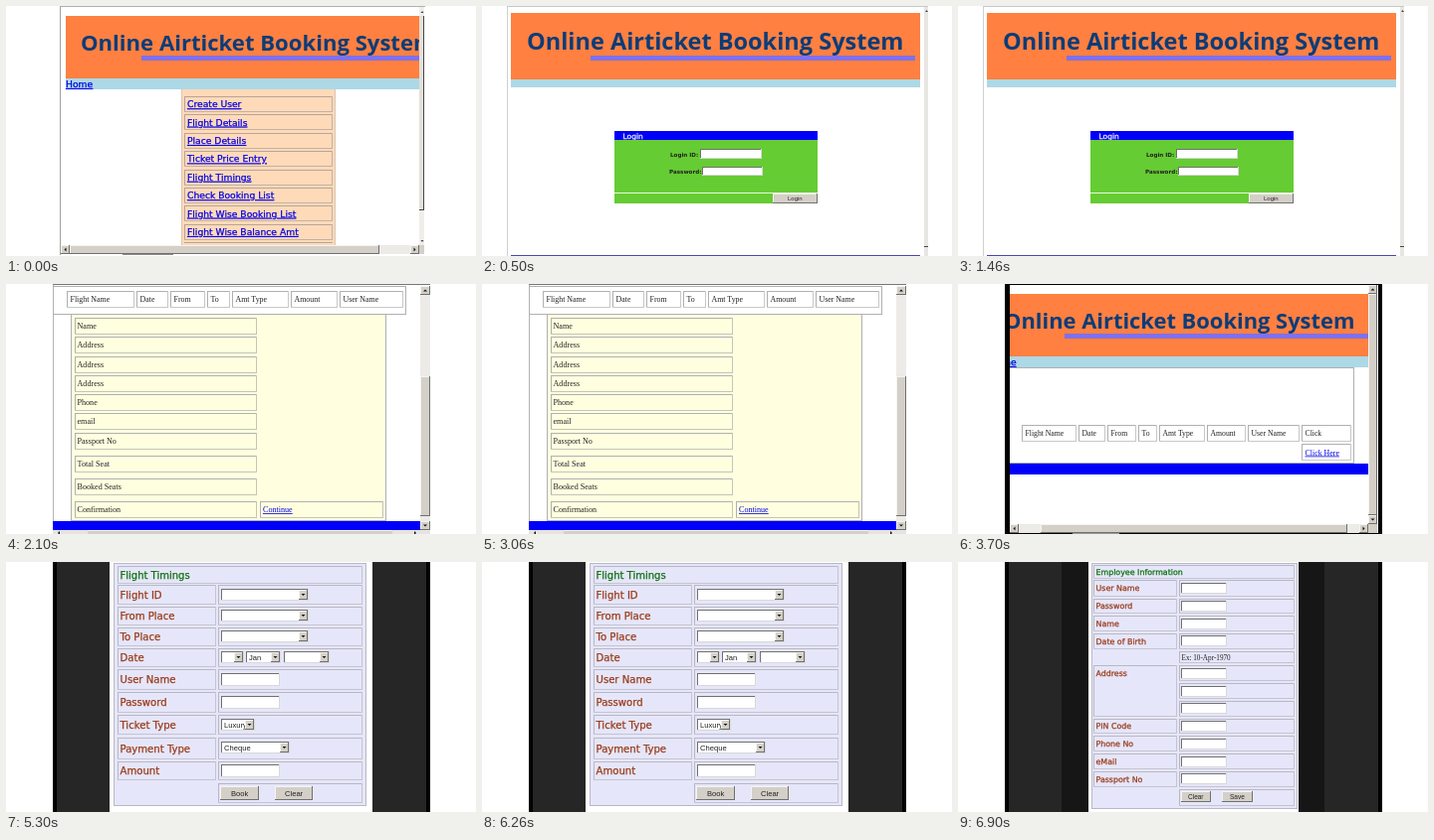
An HTML page that plays this animation: 472x252 px, repeating every 8000 ms.

```html
<!DOCTYPE html>
<html lang="en">
<head>
<meta charset="utf-8">
<title>Airticket booking screens</title>
<style>
html, body { margin: 0; width: 100%; height: 100%; overflow: hidden; background: #fff; }
svg { display: block; width: 472px; height: 252px; }
rect { shape-rendering: crispEdges; }
text { white-space: pre; }
.title { font-family: "Open Sans", sans-serif; font-weight: 700; fill: #0c3c78; }
.wide { font-family: "DejaVu Sans", sans-serif; stroke: currentColor; stroke-width: .25px; }
.bold { font-family: "DejaVu Sans", sans-serif; font-weight: 700; }
.serif { font-family: "Liberation Serif", serif; }
.plain { font-family: "Liberation Sans", sans-serif; }
.link { fill: #0000e6; color: #0000e6; text-decoration: underline; }
</style>
</head>
<body>
<svg id="stage" viewBox="0 0 472 252"></svg>
<script>
const ORANGE = '#ff8040', SKY = '#add8e6', BLUE = '#0000f8', FACE = '#d4d0c8', PEACH = '#ffdab9',
      LAVENDER = '#e6e6fa', EDGE = '#b0b0b0', SOFT = '#b8b8c4', BROWN = '#993a18', GREEN = '#0a700a';

// Boxes are given by their left, top, right and bottom edges.
const box = (l, t, r, b, fill) =>
  `<rect x="${l}" y="${t}" width="${r - l}" height="${b - t}" fill="${fill}"/>`;
const frame = (l, t, r, b, fill, dark = EDGE, light = dark) =>
  box(l, t, r, b, light) + box(l, t, r - 1, b - 1, dark) + box(l + 1, t + 1, r - 1, b - 1, fill);
const text = (s, x, y, size, cls, fill = '#222') =>
  `<text x="${x}" y="${y}" font-size="${size}" class="${cls}" fill="${fill}" color="${fill}">${s}</text>`;

const field = (l, t, r, b) => frame(l, t, r, b, '#fff', '#707070', '#d8d8d8');
const raised = (l, t, r, b) => frame(l, t, r, b, FACE, '#f4f4f0', '#707070');
const button = (l, t, r, b, s, x, size) =>
  raised(l, t, r, b) + text(s, x, (t + b) / 2 + size * .36, size, 'plain');

const TURN = { up: 180, down: 0, left: 90, right: -90 };
const arrow = (x, y, way, k = 2) =>
  `<path d="M${-k} ${-k / 2}H${k}L0 ${k / 2}Z" transform="translate(${x} ${y}) rotate(${TURN[way]})" fill="#111"/>`;
const select = (l, y, r, s = '') =>
  field(l, y - 6, r, y + 6) + text(s, l + 3, y + 2.8, 7.6, 'plain') +
  raised(r - 10, y - 5, r - 1, y + 5) + arrow(r - 5.5, y, 'down');

function barX(l, t, r, b, from, to) {
  const y = (t + b) / 2;
  return box(l, t, r, b, '#ecebe7') + raised(from, t, to, b) +
    raised(l, t, l + 9, b) + raised(r - 9, t, r, b) +
    arrow(l + 4.5, y, 'left') + arrow(r - 4.5, y, 'right');
}
function barY(l, t, r, b, from, to) {
  const x = (l + r) / 2;
  return box(l, t, r, b, '#ecebe7') + raised(l, from, r, to) +
    raised(l, t, r, t + 9) + raised(l, b - 9, r, b) +
    arrow(x, t + 4.5, 'up') + arrow(x, b - 4.5, 'down');
}

const banner = (l, r, top, split, end, x, y, size, lineL, lineR, lineY) =>
  box(l, top, r, split, ORANGE) + box(l, split, r, end, SKY) +
  box(lineL, lineY, lineR, lineY + 5, '#8070ec') +
  text('Online Airticket Booking System', x, y, size, 'title');

const tableRow = (cells, t, b, size) => cells.map(([l, r, s]) =>
  frame(l, t, r, b, '#fff', EDGE, '#c8c8c8') +
  text(s, l + 3.5, (t + b) / 2 + size * .31, size, 'serif')).join('');

function menu() {
  const items = ['Create User', 'Flight Details', 'Place Details', 'Ticket Price Entry',
    'Flight Timings', 'Check Booking List', 'Flight Wise Booking List', 'Flight Wise Balance Amt'];
  const rows = items.map((s, i) => {
    const y = 99 + i * 18.4, top = Math.round(y - 8);
    return frame(179, top, 328, top + 16, PEACH, '#b8a498', '#c4b0a4') +
      text(s, 182, y + 3.2, 9.2, 'wide link');
  }).join('');
  return box(54, 0, 421, 1, '#b0b0b0') + box(54, 1, 55, 251, '#a0a0a0') +
    banner(60, 415, 10, 73, 84, 75, 45, 22.1, 136, 415, 50) +
    text('Home', 60, 82, 9.2, 'wide link') +
    box(176, 84, 331, 241, PEACH) + box(176, 84, 177, 241, '#dcc4b0') +
    box(330, 84, 331, 241, '#dcc4b0') + rows + box(179, 238, 328, 239, '#b8a498') +
    box(415, 1, 472, 241, '#fff') + box(415, 1, 420, 241, '#f0eeea') +
    box(415, 10, 419, 205, '#e2e0da') + box(419, 10, 420, 205, '#444') +
    box(415, 205, 420, 206, '#444') +
    arrow(418, 6, 'up', 1.5) + arrow(418, 237, 'down', 1.5) +
    barX(55, 241, 415, 250, 64, 375) + box(415, 241, 420, 250, FACE) +
    box(117, 250, 168, 251, '#888');
}

function login() {
  return box(25, 0, 448, 1, '#c8c8c8') + box(25, 1, 26, 252, '#d0d0d0') +
    banner(29, 440, 7, 74, 82, 45, 43.5, 23.5, 109, 435, 50) +
    box(444, 1, 448, 252, '#e8e6e2') +
    box(444, 242, 448, 243, '#444') + arrow(446.5, 5, 'up', 1.5) +
    box(133, 126, 337, 135, BLUE) + text('Login', 141.5, 133.5, 7.5, 'wide', '#fff') +
    box(133, 135, 337, 199, '#66cc33') + box(133, 188, 337, 189, '#e8f8e0') +
    text('Login ID:', 189, 151.5, 5.6, 'bold') + field(219, 144, 281, 154) +
    text('Password:', 188, 169, 5.6, 'bold') + field(221, 162, 282, 171) +
    button(292, 189, 337, 199, 'Login', 307, 6) +
    box(29, 251, 440, 252, '#4a48b0');
}

function passenger() {
  const labels = ['Name', 'Address', 'Address', 'Address', 'Phone', 'email',
    'Passport No', 'Total Seat', 'Booked Seats', 'Confirmation'];
  const cell = (l, t, r) => frame(l, t, r, t + 17, '#ffffe0', EDGE, '#c4c4b8');
  const rows = labels.map((s, i) => {
    const y = i < 7 ? 42.5 + i * 19.25 : 181.5 + (i - 7) * 23;
    return cell(69, Math.round(y - 8.5), 252) + text(s, 71.5, y + 2.6, 8.1, 'serif');
  }).join('');
  return box(47, 0, 426, 1, '#777') + box(47, 1, 48, 252, '#b4b4b4') +
    frame(47, 2, 402, 31, '#fff') +
    tableRow([[61, 129, 'Flight Name'], [131, 163, 'Date'], [165, 200, 'From'], [202, 225, 'To'],
      [227, 284, 'Amt Type'], [286, 333, 'Amount'], [335, 399, 'User Name']], 7, 24, 7.9) +
    frame(65, 30, 382, 239, '#ffffe0') + rows +
    cell(255, 219, 379) + text('Continue', 258, 230.2, 8.1, 'serif link') +
    box(47, 239, 416, 248, BLUE) +
    barY(416, 2, 426, 248, 93, 234) +
    box(47, 248, 426, 252, '#e6e4e0') + box(82, 248, 388, 252, FACE) +
    box(82, 248, 388, 249, '#f4f4f4') + arrow(53, 251, 'left') + arrow(411, 251, 'right');
}

function booking() {
  return box(47, 0, 426, 252, '#000') + box(52, 1, 422, 251, '#fff') +
    `<svg x="52" width="360" height="252" viewBox="52 0 360 252">` +
    banner(52, 412, 10, 73, 84, 46, 45, 21.9, 107, 412, 50) +
    text('Home', 31.5, 82, 9.2, 'wide link') +
    frame(48, 84, 398, 181, '#fff') + '</svg>' +
    tableRow([[64, 119, 'Flight Name'], [121, 148, 'Date'], [150, 179, 'From'], [181, 200, 'To'],
      [202, 248, 'Amt Type'], [250, 289, 'Amount'], [291, 343, 'User Name'],
      [345, 395, 'Click']], 142, 159, 7.7) +
    tableRow([[345, 395, '']], 161, 178, 7.7) +
    text('Click Here', 348.5, 172.5, 7.9, 'serif link') +
    box(52, 181, 412, 192, BLUE) +
    barY(412, 1, 421, 242, 10, 233) + barX(52, 242, 412, 251, 83, 391) +
    box(412, 242, 421, 251, FACE) + box(115, 251, 162, 252, '#999');
}

// A form row has a label cell and an empty cell for its controls.
const cell = (l, t, r, b) => frame(l, t, r, b, LAVENDER, SOFT, '#c4c4d0');
const formRow = (left, mid, right, t, b, s, size) =>
  cell(left, t, mid - 2, b) + cell(mid, t, right, b) +
  text(s, left + 2.5, (t + b) / 2 + size * .36, size, 'wide', BROWN);

const sideBars = () => box(47, 0, 426, 252, '#000') + box(51, 0, 422, 252, '#262626');

function timings() {
  const rows = [['Flight ID', 23, 43], ['From Place', 45, 64], ['To Place', 66, 85],
    ['Date', 87, 106], ['User Name', 108, 129], ['Password', 131, 152],
    ['Ticket Type', 154, 174], ['Payment Type', 177, 199], ['Amount', 201, 220]];
  return sideBars() + box(104, 0, 368, 252, '#fff') +
    frame(108, 1, 362, 246, LAVENDER, SOFT) +
    cell(112, 4, 358, 22) + text('Flight Timings', 114.5, 17, 10, 'wide', GREEN) +
    rows.map(([s, t, b]) => formRow(112, 213, 358, t, b, s, 10.1)).join('') +
    cell(213, 223, 358, 243) +
    [33, 54, 75].map(y => select(216, y, 304)).join('') +
    select(216, 96, 239) + select(241, 96, 276, 'Jan') + select(279, 96, 325) +
    [118, 141, 210].map(y => field(216, y - 6, 275, y + 7)).join('') +
    select(216, 164, 250, 'Luxury') + select(216, 187, 285, 'Cheque') +
    button(215, 226, 254, 240, 'Book', 226, 7.6) + button(270, 226, 308, 240, 'Clear', 280, 7.6);
}

function employee() {
  const rows = [['User Name', 18, 35], ['Password', 37, 52], ['Name', 54, 70],
    ['Date of Birth', 72, 88], ['PIN Code', 158, 173], ['Phone No', 175, 191],
    ['eMail', 193, 209], ['Passport No', 211, 227]];
  const side = (t, b) => cell(222, t, 338, b);
  return sideBars() + box(104, 0, 368, 252, '#161616') +
    box(131, 0, 342, 252, '#fff') + frame(134, 1, 341, 249, LAVENDER, SOFT) +
    cell(136, 3, 338, 17) +
    text('Employee Information', 138.5, 13, 7.9, 'wide', GREEN) +
    rows.map(([s, t, b]) => formRow(136, 222, 338, t, b, s, 7.9)).join('') +
    side(90, 102) + text('Ex: 10-Apr-1970', 224.5, 98.7, 7.2, 'serif') +
    cell(136, 104, 220, 156) + text('Address', 138.5, 115, 7.9, 'wide', BROWN) +
    side(104, 120) + side(122, 138) + side(140, 156) + side(229, 246) +
    [26, 44, 62, 79, 112, 130, 147, 165, 183, 201, 218]
      .map(y => field(224, y - 5, 270, y + 6)).join('') +
    button(224, 231, 254, 242, 'Clear', 231, 6.5) + button(265, 231, 296, 242, 'Save', 273, 6.5);
}

const stage = document.getElementById('stage');
const scenes = [[0, menu], [500, login], [2100, passenger], [3700, booking], [5300, timings], [6900, employee]];
stage.innerHTML = scenes.map(([, draw]) => `<g display="none">${draw()}</g>`).join('');
const layers = [...stage.children];
const start = performance.now();

function show() {
  const time = Math.max(0, performance.now() - start) % 8000;
  const now = scenes.filter(([from]) => from <= time).length - 1;
  layers.forEach((g, i) => g.setAttribute('display', i === now ? 'inline' : 'none'));
  requestAnimationFrame(show);
}
show();
</script>
</body>
</html>
```
